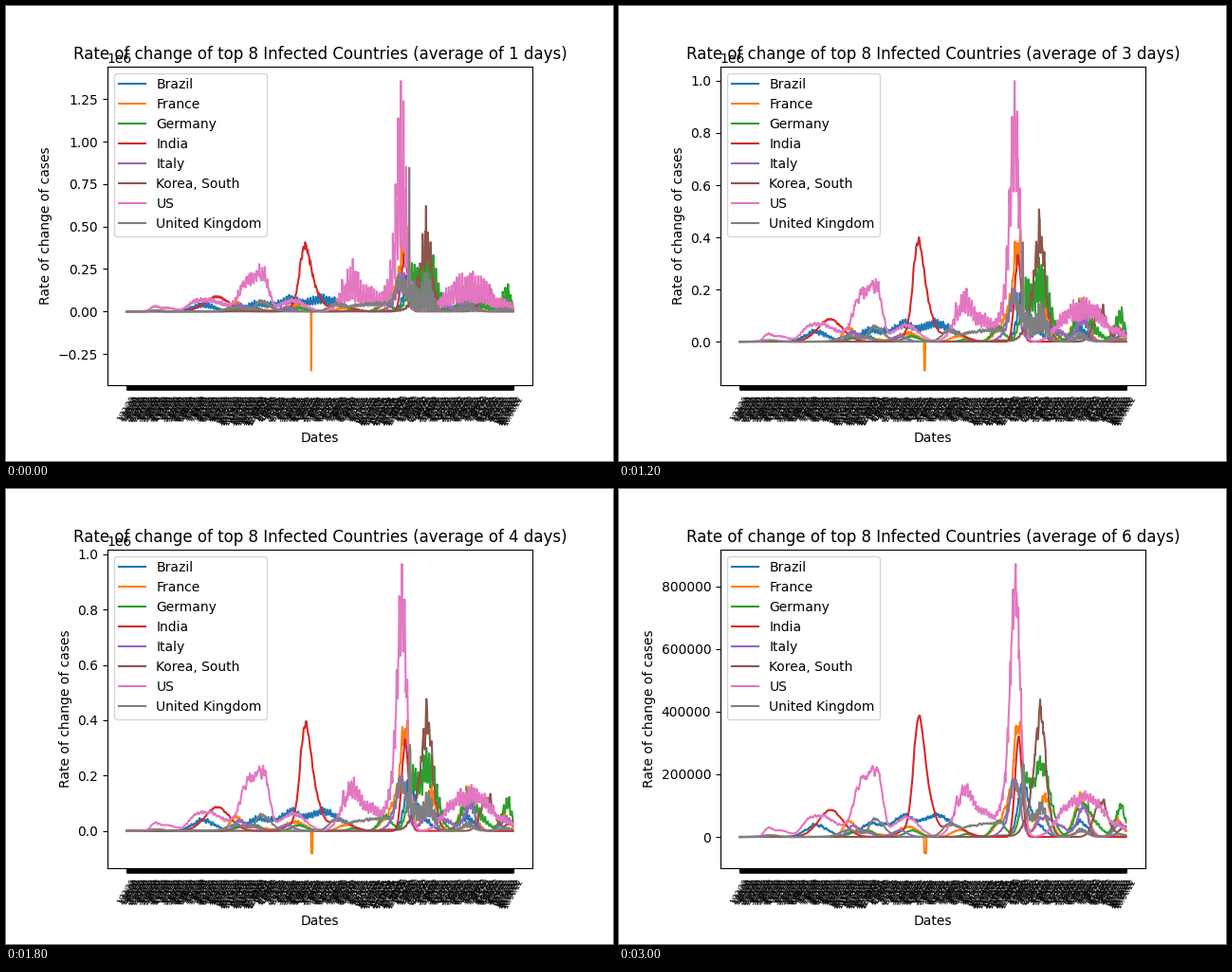
Recreate the animation shown at these times as a matplotlib script. Size 640x480 px, loop 3600 ms.

```python
import numpy as np
import matplotlib.pyplot as plt
from matplotlib.animation import FuncAnimation

plt.rcParams["font.family"] = "DejaVu Sans"
LAST = 1013
DAYS = np.arange(LAST + 1)
rng = np.random.default_rng(8)

# Weekday reporting weights, Wednesday to Tuesday.
PLAIN = np.array([1.2, 1.15, 1.1, 0.9, 0.6, 0.5, 1.55])
MONDAY = np.array([1.07, 1.086, 1.127, 0.631, 0.48, 1.704, 0.986])
WORKDAYS = np.array([1.4, 1.2, 1.1, 0, 0, 2.3, 1])


def daily(waves, swing=(0.5, 1), week=PLAIN, noise=0.07, turn=745):
    """Daily cases: (day, thousands, width) waves under a weekly rhythm.

    The rhythm's strength moves from swing[0] to swing[1] around the turn.
    """
    trend = sum(h * np.exp(-0.5 * ((DAYS - d) / w) ** 2) for d, h, w in waves)
    ramp = 1 / (1 + np.exp((turn - DAYS) / 8))
    strength = swing[0] + (swing[1] - swing[0]) * ramp
    rhythm = 1 + strength * (week[DAYS % 7] - 1)
    white = rng.standard_normal(DAYS.size)
    jitter = 1 + noise * np.convolve(white, [0.5, 1, 0.5], "same")
    return 1e3 * trend * np.clip(rhythm * jitter, 0, None)


brazil = daily([(200, 38, 28), (345, 42, 35), (430, 62, 28), (510, 68, 30),
                (570, 25, 25), (740, 170, 13), (775, 45, 20), (890, 48, 20)],
               swing=(0.7, 0.9))
france = daily([(78, 5, 12), (284, 48, 14), (330, 14, 30), (440, 33, 26),
                (575, 22, 20), (675, 35, 15), (705, 100, 14), (729, 370, 11),
                (796, 130, 16), (893, 130, 17), (989, 55, 14)])
germany = daily([(75, 5, 10), (290, 16, 12), (330, 22, 18), (450, 20, 20),
                 (595, 9, 15), (677, 52, 16), (751, 180, 15), (789, 225, 15),
                 (815, 60, 14), (893, 95, 18), (925, 40, 22), (996, 95, 13)],
                swing=(0.5, 1.1))
india = daily([(236, 85, 32), (425, 18, 15), (467, 375, 14), (495, 95, 15),
               (555, 38, 30), (729, 325, 9), (895, 18, 20)],
              swing=(0.1, 0.1), noise=0.02)
italy = daily([(65, 5, 10), (293, 32, 14), (325, 15, 20), (418, 21, 18),
               (690, 20, 15), (720, 180, 13), (795, 65, 20), (840, 30, 18),
               (898, 95, 14), (994, 40, 15)], swing=(0.6, 0.8))
korea = daily([(690, 5, 20), (740, 20, 12), (765, 70, 14), (787, 355, 15),
               (945, 118, 17), (1010, 33, 15)], swing=(0.5, 0.5))
us = daily([(72, 20, 8), (100, 22, 25), (180, 55, 18), (215, 28, 18),
            (240, 40, 30), (322, 190, 23), (358, 165, 14), (435, 65, 30),
            (586, 145, 24), (645, 65, 24), (690, 95, 13), (855, 85, 28),
            (920, 115, 35), (1000, 25, 25)],
           swing=(0.25, 1.1), week=MONDAY, turn=550)
us += daily([(720.5, 793, 13)], swing=(1, 1), week=MONDAY, noise=0)
uk = daily([(85, 5, 15), (285, 21, 25), (352, 52, 14), (375, 20, 18),
            (548, 40, 18), (600, 30, 22), (645, 38, 22), (680, 30, 15),
            (716, 165, 13), (747, 70, 14), (788, 88, 15), (893, 22, 15),
            (990, 8, 20)], swing=(0.15, 1.2), week=WORKDAYS)

# Corrections and backlogs booked on a single day.
france[484] = -348e3
uk[741] = 846e3
korea[785] = 621e3

SERIES = {"Brazil": brazil, "France": france, "Germany": germany,
          "India": india, "Italy": italy, "Korea, South": korea,
          "US": us, "United Kingdom": uk}


def trailing_mean(y, n):
    total = np.concatenate([np.zeros(n), np.cumsum(y)])
    return (total[n:] - total[:-n]) / n


def date_label(day):
    year, month, dom = str(np.datetime64("2020-01-22") + int(day)).split("-")
    return f"{int(month)}/{int(dom)}/{year[2:]}"


fig = plt.figure(figsize=(6.4, 4.8), dpi=100)
ax = fig.add_axes([0.167, 0.167, 0.7, 0.7])
lines = [ax.plot(DAYS, y, label=name)[0] for name, y in SERIES.items()]
ax.set_xlim(-0.05 * LAST, 1.05 * LAST)
ax.set_xticks([])
ax.set_xlabel("Dates", labelpad=35.7)
ax.set_ylabel("Rate of change of cases")
ax.legend(loc="upper left")

# Daily ticks merge into a band above crowded, slanted dates.
below = ax.get_xaxis_transform()
ax.plot(DAYS, 0 * DAYS, ls="", marker=3, ms=3.5, mew=0.8, color="black",
        transform=below, clip_on=False)
for day in DAYS[::4]:
    ax.text(day, -0.0289, date_label(day), transform=below, rotation=60,
            size=5.5, ha="center", va="top")


def update(i):
    n = i + 1
    means = [trailing_mean(y, n) for y in SERIES.values()]
    for line, y in zip(lines, means):
        line.set_ydata(y)
    low, high = np.min(means), np.max(means)
    margin = 0.05 * (high - low)
    ax.set_ylim(low - margin, high + margin)
    ax.set_title("Rate of change of top 8 Infected Countries "
                 f"(average of {n} days)", y=1)
    return lines


anim = FuncAnimation(fig, update, frames=6, interval=600, repeat=True,
                     repeat_delay=0, blit=False)
plt.show()
```
